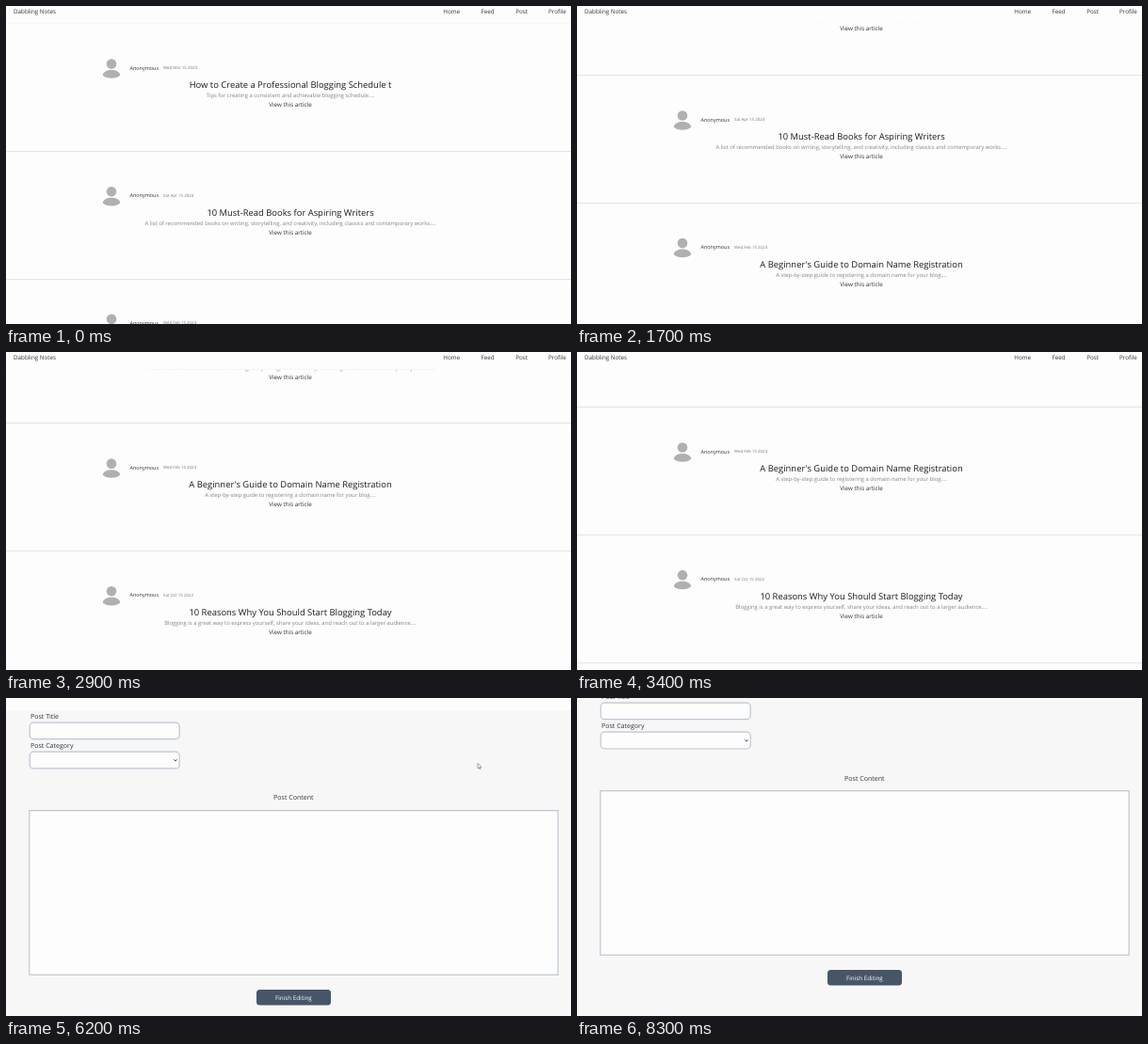
An HTML page for the animation above (9.9 s loop, 600 by 338 pixels).

```html
<!DOCTYPE html>
<html lang="en">
<head>
<meta charset="utf-8">
<title>Blog feed and post form</title>
<style>
  html, body { margin: 0; width: 100%; height: 100%; overflow: hidden; background: #fdfdfd; }
  svg { display: block; width: 600px; height: 338px; }
  text {
    font-family: "Open Sans", "Noto Sans", sans-serif;
    font-size: 6.28px;
    fill: #333;
    text-rendering: geometricPrecision;
    white-space: pre;
  }
  .mid { text-anchor: middle; }
  .title { font-size: 9.42px; fill: #1c1c1c; }
  .desc { font-size: 5.9px; fill: #858585; }
  .name { font-size: 5.47px; }
  .date { font-size: 4.41px; fill: #777; }
  .label { font-size: 7.04px; }
  .rule { stroke: #e4e3e5; shape-rendering: crispEdges; }
  .avatar { fill: #b0b0b0; }
  .box { fill: #fdfdfd; stroke: #bcc6d1; stroke-width: 1.2; }
  .cursor { fill: #fff; stroke: #666; stroke-width: .6; stroke-linejoin: round; }
</style>
</head>
<body>
<svg viewBox="0 0 600 338">
  <rect width="600" height="338" fill="#fdfdfd"/>
  <g id="feed"></g>
  <g id="form">
    <rect y="24" width="600" height="400" fill="#f7f7f8"/>
    <text class="label" x="26" y="33">Post Title</text>
    <rect class="box" x="25.2" y="37.2" width="159" height="17.5" rx="4"/>
    <text class="label" x="26" y="64.1">Post Category</text>
    <rect class="box" x="25.2" y="68.2" width="159" height="17.8" rx="4"/>
    <path d="M178.3 76.4l1.6 1.7 1.6-1.7" fill="none" stroke="#333" stroke-width=".9"/>
    <text class="label mid" x="305.3" y="119.5">Post Content</text>
    <rect class="box" x="24.8" y="130.7" width="561.4" height="174.5"/>
    <rect x="266" y="321" width="79" height="16.5" rx="3.5" fill="#475569"/>
    <text class="mid" x="305.4" y="331.8" style="fill:#fff">Finish Editing</text>
  </g>
  <g id="nav">
    <rect width="600" height="18.8" fill="#fdfdfd"/>
    <text x="8" y="8.2">Dabbling Notes</text>
    <text x="464.3" y="8.2">Home</text>
    <text x="504.6" y="8.2">Feed</text>
    <text x="541.2" y="8.2">Post</text>
    <text x="576" y="8.2">Profile</text>
  </g>
  <g id="pointer">
    <path id="arrow" class="cursor" d="M0 0V5.4L1.3 4.3 2.2 6.3 3 5.9 2.1 4 3.8 3.9Z"/>
    <path id="hand" class="cursor" d="M1.6 .4Q2.2 -.2 2.6 .5V2.6L5.4 3.2Q6.2 3.5 5.9 4.6L5.3 6.8H2.3L.3 4.4Q.3 3.6 1.6 4.2Z"/>
    <path id="beam" d="M-1 -3H1M0 -3V3M-1 3H1" fill="none" stroke="#555" stroke-width=".6"/>
  </g>
</svg>
<script>
const LOOP = 9900, STEP = 100, PITCH = 135.6, NOTCH = 22.96;
const POINTER_IN = 5000, FORM_AT = 5400, POINTER_OUT = 7900;
const $ = id => document.getElementById(id);

const posts = [
  ["Wed Mar 15 2023", "How to Create a Professional Blogging Schedule t",
    "Tips for creating a consistent and achievable blogging schedule...."],
  ["Sat Apr 15 2023", "10 Must-Read Books for Aspiring Writers",
    "A list of recommended books on writing, storytelling, and creativity, including classics and contemporary works...."],
  ["Wed Feb 15 2023", "A Beginner's Guide to Domain Name Registration",
    "A step-by-step guide to registering a domain name for your blog...."],
  ["Sat Oct 15 2022", "10 Reasons Why You Should Start Blogging Today",
    "Blogging is a great way to express yourself, share your ideas, and reach out to a larger audience...."],
  ["Sat Jul 15 2023", "", ""]
];

$("feed").innerHTML = posts.map(([date, title, desc], i) => `
  <g transform="translate(0 ${i * PITCH})">
    <path class="rule" d="M0 18.9H600"/>
    <circle class="avatar" cx="112" cy="61.6" r="5.3"/>
    <path class="avatar" d="M102.8 73.8C103 66.2 121 66.2 121.2 73.8Q118 76.8 112 76.8T102.8 73.8Z"/>
    <text class="name" x="131.5" y="67.7">Anonymous</text>
    <text class="date" x="167" y="67.1">${date}</text>
    <text class="title mid" x="302" y="87.1">${title}</text>
    <text class="desc mid" x="302" y="97.3">${desc}</text>
    <text class="mid" x="302" y="107.2">View this article</text>
  </g>`).join("");

const easeInOut = p => p < .5 ? 8 * p ** 4 : 1 - 8 * (1 - p) ** 4;
const easeOut = p => 1 - (1 - p) ** 3;
const smooth = p => p * p * (3 - 2 * p);

const progress = (t, start, span) => Math.min(1, Math.max(0, (t - start) / span));

// Wheel turns: start, duration, notches
const turns = [[1330, 570, 4], [2030, 443, 3], [2630, 457, 3], [3330, 270, 2]];
const feedScroll = t => turns.reduce(
  (y, [start, span, n]) => y + n * NOTCH * easeInOut(progress(t, start, span)), 0);

const formScroll = t => 32 * easeOut(progress(t, 6100, 760));

// Pointer trips: start, duration, destination
const trips = [
  [4900, 400, 547.5, 6.3], [5600, 300, 501, 69.5], [7000, 300, 455, 260], [7400, 500, 408, 340]
];
const pointer = t => trips.reduce(([x, y], [start, span, toX, toY]) => {
  const p = smooth(progress(t, start, span));
  return [x + (toX - x) * p, y + (toY - y) * p];
}, [450, 340]);

const show = (id, on) => $(id).setAttribute("visibility", on ? "visible" : "hidden");
const move = (id, x, y) => $(id).setAttribute("transform", `translate(${x} ${y})`);

function draw(t) {
  const form = t >= FORM_AT, formY = formScroll(t), [x, y] = pointer(t);
  show("feed", !form);
  show("form", form);
  move("feed", 0, -feedScroll(t));
  move("form", 0, -formY);
  move("nav", 0, -formY);
  move("pointer", x, y);

  const seen = t >= POINTER_IN && t < POINTER_OUT;
  const hand = y < 10;
  const beam = form && y > 131 - formY && y < 305 - formY;
  show("hand", seen && hand);
  show("beam", seen && beam);
  show("arrow", seen && !hand && !beam);
}

const start = performance.now();
function tick() {
  const t = (performance.now() - start) % LOOP;
  draw(Math.floor(t / STEP) * STEP);
  requestAnimationFrame(tick);
}
tick();
</script>
</body>
</html>
```
